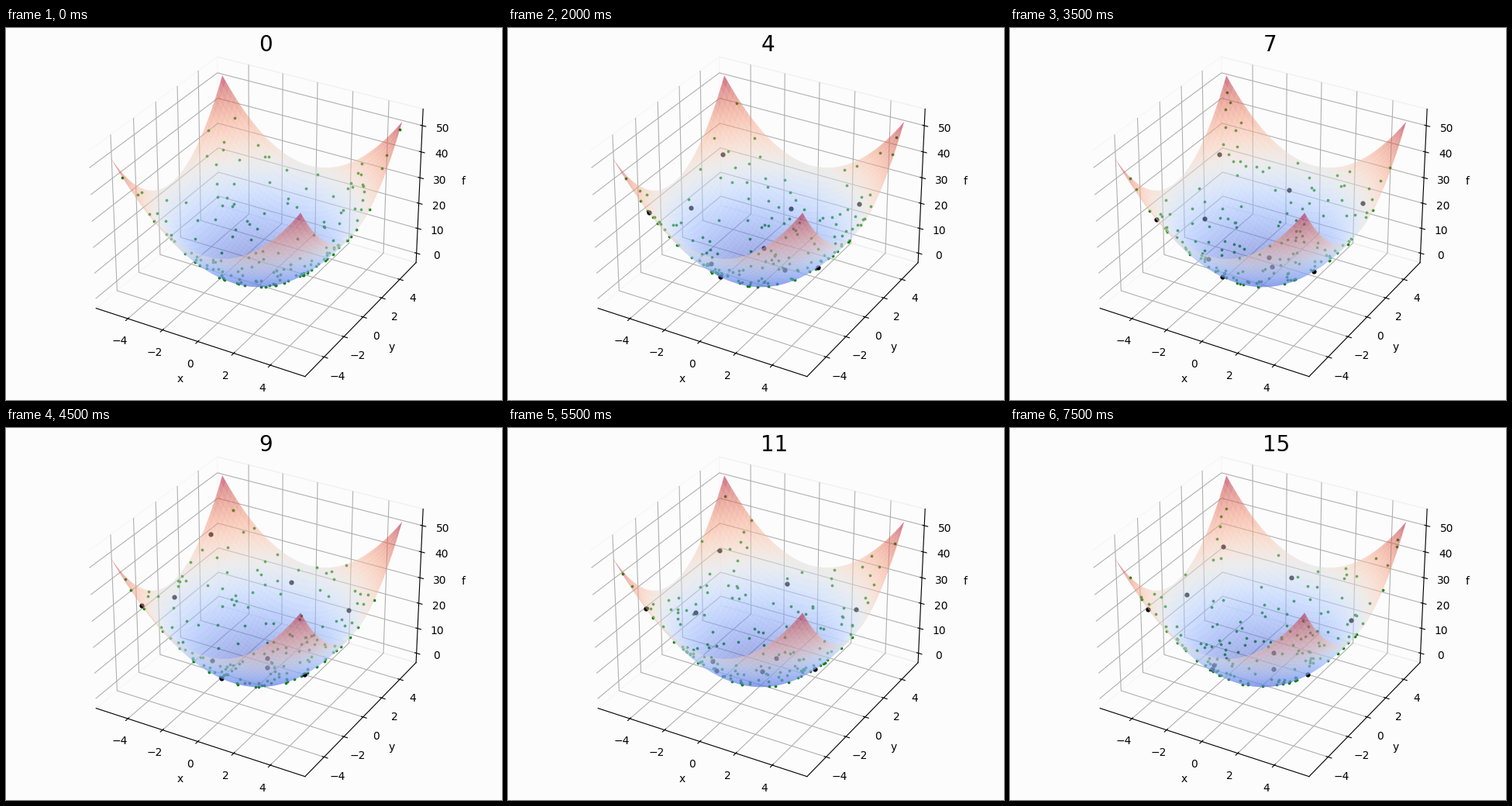
A matplotlib script that plays this animation: 640x480 px, repeating every 8000 ms.

```python
import numpy as np
import matplotlib.pyplot as plt
from matplotlib.animation import FuncAnimation

W, H, DPI = 640, 480, 100
STEPS, STEP_MS = 16, 500
LIMIT, SAMPLES = 5.12, 165
WOBBLE = 0.3
PAPER = "#fcfcfc"

# Mean (x, y) of each cluster centre; every step scatters around these.
HOMES = np.array([(-4.3, 3.4), (-4.2, 0.3), (-0.8, 4.2), (3.4, 2.9),
                  (-3.5, -5.0), (-2.1, -1.4), (-0.5, 1.4), (3.1, -0.5),
                  (-0.4, -3.5), (3.0, -3.9)])


def sphere(x, y):
    return x**2 + y**2


def on_surface(xy):
    x, y = np.clip(xy, -LIMIT, LIMIT).T
    return x, y, sphere(x, y)


def padded(lo, hi):
    """Limits with a 5 % data margin plus a 1/48 view margin."""
    for pad in (1 / 20, 1 / 48):
        d = (hi - lo) * pad
        lo, hi = lo - d, hi + d
    return lo, hi


fig = plt.figure(figsize=(W / DPI, H / DPI), dpi=DPI, facecolor=PAPER)
ax = fig.add_axes((0, 0, 1, 1), projection="3d", facecolor=PAPER)
ax.computed_zorder = False
ax.view_init(elev=30, azim=-60)

side = np.linspace(-LIMIT, LIMIT, 51)
gx, gy = np.meshgrid(side, side)
ax.plot_surface(gx, gy, sphere(gx, gy), rstride=1, cstride=1,
                cmap="coolwarm", alpha=0.5, linewidth=0,
                antialiased=True, zorder=5)

ax.set_xlim(*padded(-LIMIT, LIMIT))
ax.set_ylim(*padded(-LIMIT, LIMIT))
ax.set_zlim(*padded(0, 2 * LIMIT**2))
ax.set(xticks=range(-4, 5, 2), yticks=range(-4, 5, 2), zticks=range(0, 51, 10),
       xlabel="x", ylabel="y", zlabel="f")
for axis in (ax.xaxis, ax.yaxis, ax.zaxis):
    axis.pane.fill = False

dots, = ax.plot([], [], [], "o", color="green", ms=2.7, mew=0, zorder=2)
hubs, = ax.plot([], [], [], "o", color="black", ms=4.5, mew=0, zorder=3)
# Pseudo-2D coordinates: x = 0 is the projected centre of the box.
label = ax.text2D(0, 0.0784, "0", transform=ax.transData, fontsize=20)


def draw(step):
    rng = np.random.default_rng(100 + step)
    dots.set_data_3d(*on_surface(rng.uniform(-LIMIT, LIMIT, (SAMPLES, 2))))
    hubs.set_data_3d(*on_surface(HOMES + rng.normal(0, WOBBLE, HOMES.shape)))
    hubs.set_visible(step > 0)
    label.set_text(str(step))
    return dots, hubs, label


anim = FuncAnimation(fig, draw, frames=STEPS, interval=STEP_MS,
                     repeat=True, repeat_delay=0, blit=False)
plt.show()
```
